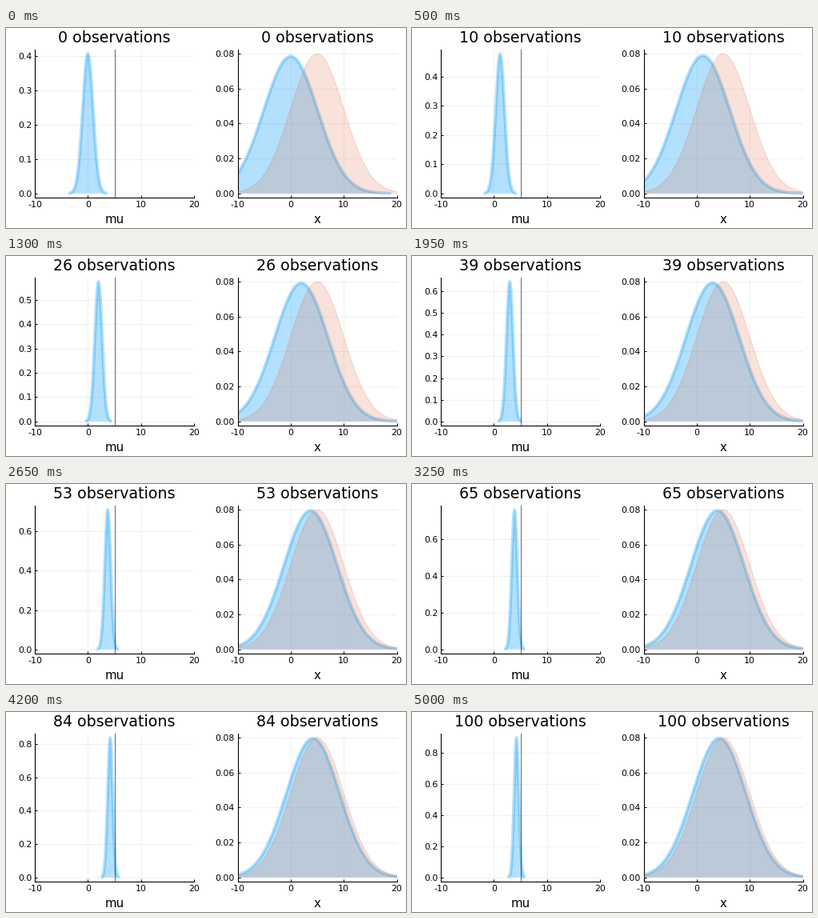
Recreate the animation shown at these times as a matplotlib script. Size 500 by 250 pixels, loop 5.05 s.

```python
import numpy as np
import matplotlib.pyplot as plt
from matplotlib.animation import FuncAnimation
from matplotlib.patches import Polygon

W, H, DPI = 500, 250, 100
FRAMES, INTERVAL = 101, 50
PX = 72 / DPI                      # points per pixel
BLUE, ORANGE = "#009af9", "#e26f46"
TRUE_MU, SIGMA = 5, 5
Z = 3.719                          # curves span the 0.01 % to 99.99 % quantiles
PEAK = 1 / np.sqrt(2 * np.pi)

plt.rcParams["font.family"] = "DejaVu Sans"


def running_sums():
    """Sum of the observations so far: a seeded walk through a few known totals."""
    keys = [0, 10, 26, 53, 65, 84, 100]
    totals = [0, 42.5, 104, 296, 355, 462, 538]
    steps = np.arange(FRAMES)
    walk = np.cumsum(np.random.default_rng(4).normal(0, 2, FRAMES))
    bridge = walk - np.interp(steps, keys, walk[keys])
    return np.interp(steps, keys, totals) + bridge


def bell(mean, sd):
    x = mean + sd * np.linspace(-Z, Z, 241)
    return x, PEAK / sd * np.exp(-0.5 * ((x - mean) / sd) ** 2)


def make_panel(left, label):
    ax = fig.add_axes([left / W, (H - 212) / H, 199 / W, 185 / H])
    ax.set_xlim(-10, 20)
    ax.set_xticks([-10, 0, 10, 20], ["-10", "0", "10", "20"])
    ax.spines[["top", "right"]].set_visible(False)
    ax.spines[["left", "bottom"]].set_linewidth(1.1 * PX)
    ax.tick_params(direction="in", length=3 * PX, width=PX, labelsize=11 * PX)
    ax.tick_params(axis="x", pad=4.5 * PX)
    ax.tick_params(axis="y", pad=3.5 * PX)
    ax.grid(color="#f0f0f0", linewidth=PX)
    ax.set_axisbelow(True)
    center = (left + 99.5) / W
    fig.text(center, 1 - 244 / H, label, ha="center", va="baseline",
             fontsize=15 * PX)
    title = fig.text(center, 1 - 17.5 / H, "", ha="center", va="baseline",
                     fontsize=19 * PX)
    return ax, title


class Curve:
    def __init__(self, ax, color, alpha, width, z):
        self.area = Polygon([(0, 0), (0, 0), (0, 0)], facecolor=color,
                            edgecolor="none", alpha=alpha, zorder=z)
        ax.add_patch(self.area)
        self.line, = ax.plot([], [], color=color, alpha=alpha, lw=width * PX,
                             solid_capstyle="butt", zorder=z + 0.1)

    def set(self, mean, sd):
        x, y = bell(mean, sd)
        self.line.set_data(x, y)
        edge = np.column_stack([x, y])
        self.area.set_xy(np.vstack([[x[0], 0], edge, [x[-1], 0]]))


def scale_y(ax, peak, step, digits):
    """Pad the range by 3 % on both sides and place the ticks."""
    ax.set_ylim(-0.03 * peak, 1.03 * peak)
    ticks = np.arange(0, 1.03 * peak, step)
    ax.set_yticks(ticks, [f"{t:.{digits}f}" for t in ticks])


fig = plt.figure(figsize=(W / DPI, H / DPI), dpi=DPI, facecolor="white")
ax_mu, title_mu = make_panel(36, "mu")
ax_x, title_x = make_panel(289.5, "x")

posterior = Curve(ax_mu, BLUE, 0.3, 4, 2)
ax_mu.axvline(TRUE_MU, color="black", alpha=0.6, lw=PX, zorder=3)
predictive = Curve(ax_x, BLUE, 0.3, 4, 2)
truth = Curve(ax_x, ORANGE, 0.2, 1.35, 3)
truth.set(TRUE_MU, SIGMA)
scale_y(ax_x, PEAK / SIGMA, 0.02, 2)

sums = running_sums()


def update(n):
    precision = 1 + (n + 1) / SIGMA**2
    mean = sums[n] / SIGMA**2 / precision
    sd = precision ** -0.5
    peak = PEAK / sd
    posterior.set(mean, sd)
    predictive.set(mean, np.hypot(SIGMA, sd))
    scale_y(ax_mu, peak, 0.1 if 1.03 * peak < 0.7 else 0.2, 1)
    for title in (title_mu, title_x):
        title.set_text(f"{n} observations")
    return []


anim = FuncAnimation(fig, update, frames=FRAMES, interval=INTERVAL,
                     init_func=lambda: update(0), repeat=True, repeat_delay=0)
plt.show()
```
